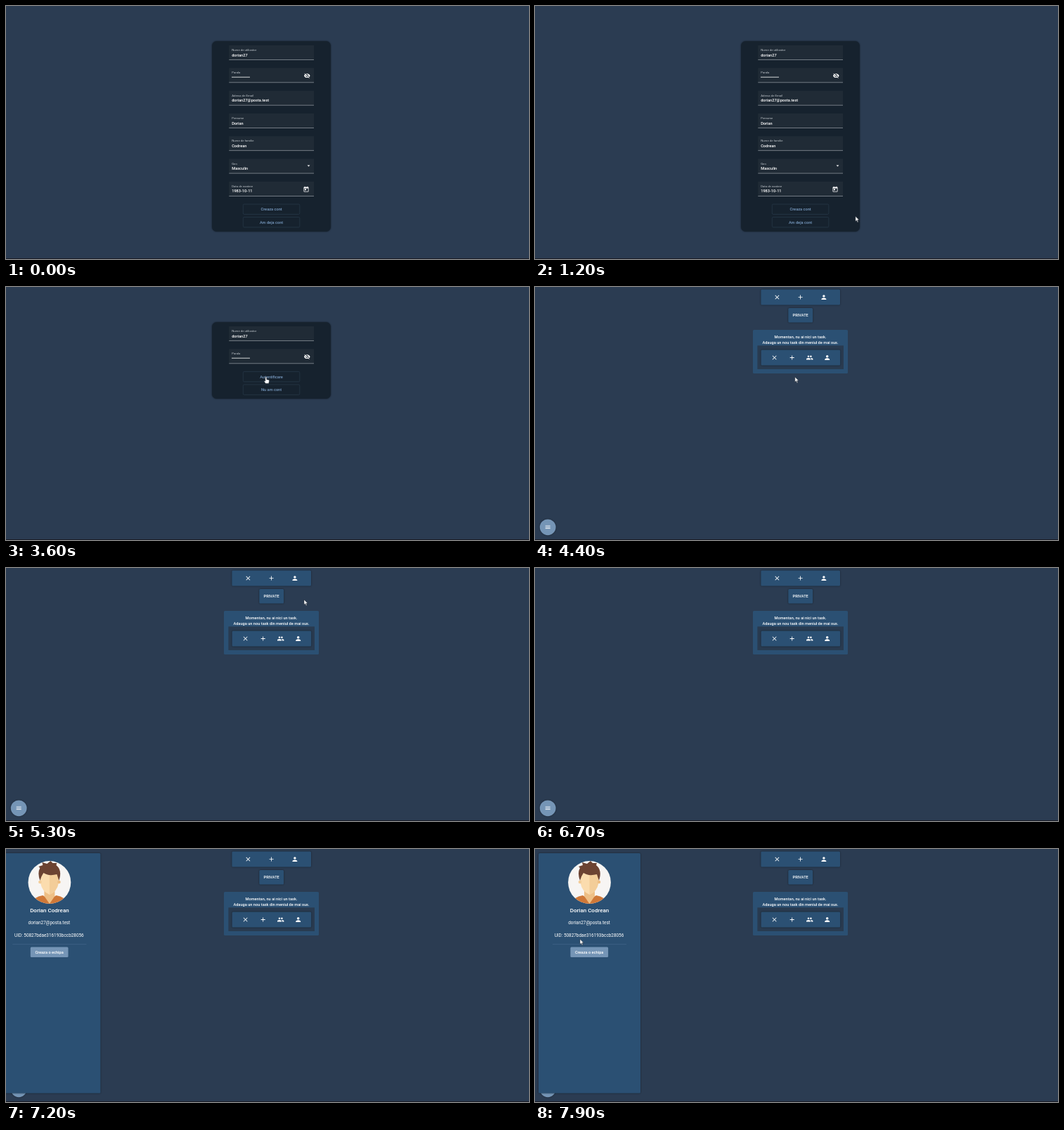
An HTML page that plays this animation: 744x360 px, repeating every 8000 ms.

```html
<!DOCTYPE html>
<html lang="ro">
<head>
<meta charset="utf-8">
<title>Cont nou</title>
<style>
  html, body { margin: 0; width: 100%; height: 100%; overflow: hidden; background: #2b3c52; }
  svg { display: block; width: 100vw; height: 100vh; }
  text { font-family: Roboto, sans-serif; font-size: 5.65px; fill: #fff; }
  .label { font-size: 4.3px; fill: #c3c9cf; }
  .value, .mid { font-weight: 500; }
  .mid { text-anchor: middle; }
  .outline { fill: none; stroke: #2d3e50; stroke-width: .6; }
  .action { fill: #799cc3; }
  .panel { fill: #2b5073; }
  .raised { filter: drop-shadow(0 .8px 1px #0007); }
  .icon { fill: #fff; }
  .soft { fill: #7595b6; }
</style>
</head>
<body>
<svg viewBox="0 0 744 360" preserveAspectRatio="none">
  <defs>
    <clipPath id="round"><circle cx="77.5" cy="47.5" r="30.4"/></clipPath>
    <g id="close"><path d="M19 6.4 17.6 5 12 10.6 6.4 5 5 6.4 10.6 12 5 17.6 6.4 19 12 13.4 17.6 19 19 17.6 13.4 12z"/></g>
    <g id="plus"><path d="M5 11h6V5h2v6h6v2h-6v6h-2v-6H5z"/></g>
    <g id="person"><circle cx="12" cy="8" r="4"/><path d="M4 20v-2c0-2.7 5.3-4 8-4s8 1.3 8 4v2z"/></g>
    <g id="group">
      <circle cx="8" cy="8" r="3"/><circle cx="16" cy="8" r="3"/>
      <path d="M1 19v-2.5C1 14.200 5.700 13 8 13s7 1.200 7 3.500V19zM17 19v-2.500c0-1.500-.7-2.600-2-3.400 3-.3 8 .9 8 3.400V19z"/>
    </g>
    <g id="eye">
      <path d="M1 12C4 2 20 2 23 12 20 22 4 22 1 12z"/>
      <circle cx="12" cy="12" r="5" fill="#202b36"/><circle cx="12" cy="12" r="3"/>
      <path d="M4 2 22 20" stroke="#202b36" stroke-width="2"/>
      <path d="M2.600 3.600 20.400 21.400" stroke="#fff" stroke-width="1.900"/>
    </g>
    <g id="date"><path fill-rule="evenodd" d="M19 3h-1V1h-2v2H8V1H6v2H5a2 2 0 0 0-2 2v14a2 2 0 0 0 2 2h14a2 2 0 0 0 2-2V5a2 2 0 0 0-2-2zM5 8h14v11H5zM7 10h5v5H7z"/></g>
    <g id="drop"><path d="M7 10l5 5 5-5z"/></g>
    <g id="menu"><path d="M3 6h18v2H3zM3 11h18v2H3zM3 16h18v2H3z"/></g>
  </defs>

  <rect width="744" height="360" fill="#2b3c52"/>
  <g id="forms"></g>
  <g id="tasks"></g>
  <g id="drawer"></g>
  <rect y="359" width="744" height="1" fill="#1a1b24"/>
  <g id="cursor" stroke="#1b232d" stroke-width=".5" stroke-linejoin="round" fill="#fff">
    <path id="arrow" d="M0 0V7.200L1.700 5.700 2.900 8.400 4.100 7.900 2.900 5.300H5.200z"/>
    <path id="hand" d="M-1 .6Q0-.9 1 .6V3.500L4 4.200Q4.900 4.500 4.700 5.600L4 9.300H-.6L-2.800 6Q-2.500 4.900-1 6z"/>
  </g>
</svg>
<script>
const $ = id => document.getElementById(id);
const LOOP = 8000, STEP = 100;
const user = { login: 'dorian27', first: 'Dorian', last: 'Codrean', mail: 'dorian27@posta.test' };

const box = (x, y, w, h, cls, r = 1.5, extra = '') =>
  `<rect x="${x}" y="${y}" width="${w}" height="${h}" rx="${r}" class="${cls}" ${extra}/>`;
const text = (x, y, str, cls, extra = '') => `<text x="${x}" y="${y}" class="${cls}" ${extra}>${str}</text>`;
const icon = (name, x, y, k = .3875) =>
  `<use href="#${name}" class="icon" transform="translate(${x} ${y}) scale(${k}) translate(-12 -12)"/>`;

function field(label, value, row, glyph = '') {
  const y = 56 + 32.3 * row;
  const shown = value
    ? text(321.2, y + 15.6, value, 'value')
    : `<path d="M322 ${y + 13}h24.500" stroke="#fff" stroke-width="1.500" stroke-linecap="round" stroke-dasharray="0 2"/>`;
  return `<rect x="317.300" y="${y}" width="120.700" height="20.600" fill="#202b36"/>` +
    `<rect x="317.300" y="${y + 20.2}" width="120.700" height=".7" fill="#98a0a7"/>` +
    text(321.2, y + 8, label, 'label') + shown + glyph;
}

const button = (y, label, id = '') =>
  box(337.3, y, 80.5, 14.4, 'outline', 1.5, id && `id="${id}"`) +
  text(377.6, y + 9.2, label, 'mid action');

const card = height => box(293, 50, 169, height, 'raised', 6.5, 'fill="#16222e"');

const credentials = field('Nume de utilizator', user.login, 0) + field('Parola', '', 1, icon('eye', 428.3, 99.2));

$('forms').innerHTML =
  `<g id="register">${card(271)}${credentials}` +
  field('Adresa de Email', user.mail, 2) +
  field('Prenume', user.first, 3) +
  field('Nume de familie', user.last, 4) +
  field('Gen', 'Masculin', 5, icon('drop', 430.5, 227.3)) +
  field('Data de nastere', '1983-10-11', 6, icon('date', 427, 261)) +
  button(282, 'Creaza cont', 'create') + button(300.4, 'Am deja cont') + '</g>' +
  `<g id="login">${card(109)}${credentials}` +
  button(120.4, 'Autentificare') + button(138.9, 'Nu am cont') + '</g>';

const toolbar = (x, y, items) =>
  box(x, y, 112.6, 22, 'panel raised') + items.map(([name, cx]) => icon(name, cx, y + 11, .43)).join('');

$('tasks').innerHTML =
  toolbar(321.4, 3.6, [['close', 344.4], ['plus', 377.6], ['person', 410.9]]) +
  box(360.3, 30, 34.8, 20.4, 'panel raised') + text(377.7, 42, 'PRIVATE', 'mid') +
  box(310, 61, 135, 62, 'panel') +
  text(377.5, 73, 'Momentan, nu ai nici un task.', 'mid') +
  text(377.5, 81, 'Adauga un nou task din meniul de mai sus.', 'mid') +
  box(316.4, 83.3, 122.6, 33.6, '', 0, 'fill="#293b50"') +
  toolbar(321.6, 89.5, [['close', 340.6], ['plus', 365.7], ['group', 390.7], ['person', 415.7]]) +
  '<circle cx="18.200" cy="341.800" r="11.400" class="soft raised"/>' + icon('menu', 18.2, 341.8);

const avatar = `<g clip-path="url(#round)">
  <rect x="46" y="16" width="63" height="63" fill="#f7f5f3"/>
  <path d="M52 79Q54 68 68 66L77.500 72 87 66Q101 68 103 79z" fill="#cf7838"/>
  <path d="M70 56H85V67L77.500 78 70 67z" fill="#eebf85"/>
  <path d="M64.500 34H90.500V48Q88 61 77.500 65 67 61 64.500 48z" fill="#fbdcae"/>
  <path d="M77.500 34H90.500V48Q88 61 77.500 65z" fill="#f3cd99"/>
  <circle cx="64" cy="47" r="2.300" fill="#f3cd99"/><circle cx="91" cy="47" r="2.300" fill="#eebf85"/>
  <path d="M64 45Q60 34 64 27L62 25 68 23 67 19 74 21 79 17 82 20 88 20 87 23Q96 30 91 45L88 36Q76 39 69 34 66 38 64 45z" fill="#6c4332"/>
</g>`;

$('drawer').innerHTML = box(5, 6, 145, 341.6, 'panel raised') + avatar +
  text(77.5, 89.7, `${user.first} ${user.last}`, 'mid', 'style="font-size:8px"') +
  text(77, 107.4, user.mail, 'mid', 'style="font-size:6.400px;font-weight:400"') +
  text(77, 125.2, 'UID: 50827bdae316193bccb28056', 'mid', 'style="font-size:6.400px;font-weight:400"') +
  '<rect x="25" y="135" width="105" height=".6" fill="#45678a"/>' +
  box(50.4, 139.4, 53.7, 14.6, 'soft') + text(77.2, 148.6, 'Creaza o echipa', 'mid');

// Rows: time, x, y of the pointer tip
const pointerPath = [
  [0, 772, 364], [100, 739, 350], [900, 499, 306], [1700, 384, 288], [2500, 385, 288],
  [2600, 385, 263.4], [2700, 384, 236], [3100, 374, 159], [3600, 369.8, 128], [4800, 369.8, 128],
  [5300, 424, 45], [5800, 424, 45], [6200, 195, 44], [6400, 100, 34], [6500, 58, 10],
  [6600, 31, 1], [6700, 20, -14], [7200, -10, -14], [7300, -10, 290], [7800, 62, 134], [7900, 64, 128.3]
];
const drawerPath = [[7000, -156], [7100, -85], [7200, -15.6], [7300, -3], [7400, 0]];

function sample(path, t) {
  const i = path.findIndex(row => row[0] > t);
  if (i < 0) return path[path.length - 1].slice(1);
  if (i === 0) return path[0].slice(1);
  const a = path[i - 1], b = path[i], k = (t - a[0]) / (b[0] - a[0]);
  return a.slice(1).map((v, n) => v + (b[n + 1] - v) * k);
}

const show = (id, on) => $(id).setAttribute('display', on ? 'inline' : 'none');
const between = (v, a, b) => v >= a && v <= b;

function render(t) {
  const [x, y] = sample(pointerPath, t);
  const registering = t < 2800, signedIn = t >= 4200;
  const overButton = !signedIn && between(x, 337, 418) &&
    (registering ? between(y, 282, 315) : between(y, 120, 153));

  show('register', registering);
  show('login', !registering && !signedIn);
  show('tasks', signedIn);
  show('drawer', t >= 7100);
  $('drawer').setAttribute('transform', `translate(${sample(drawerPath, t)[0]} 0)`);

  const lit = between(t, 1700, 2800);
  $('create').style.fill = lit ? '#213040' : 'none';
  $('create').style.stroke = lit ? '#35485c' : '';

  $('cursor').setAttribute('transform', `translate(${x} ${y})`);
  show('hand', overButton);
  show('arrow', !overButton);
}

const start = performance.now();
function tick() {
  const t = (performance.now() - start) % LOOP;
  render(Math.floor(t / STEP) * STEP);
  requestAnimationFrame(tick);
}
tick();
</script>
</body>
</html>
```
